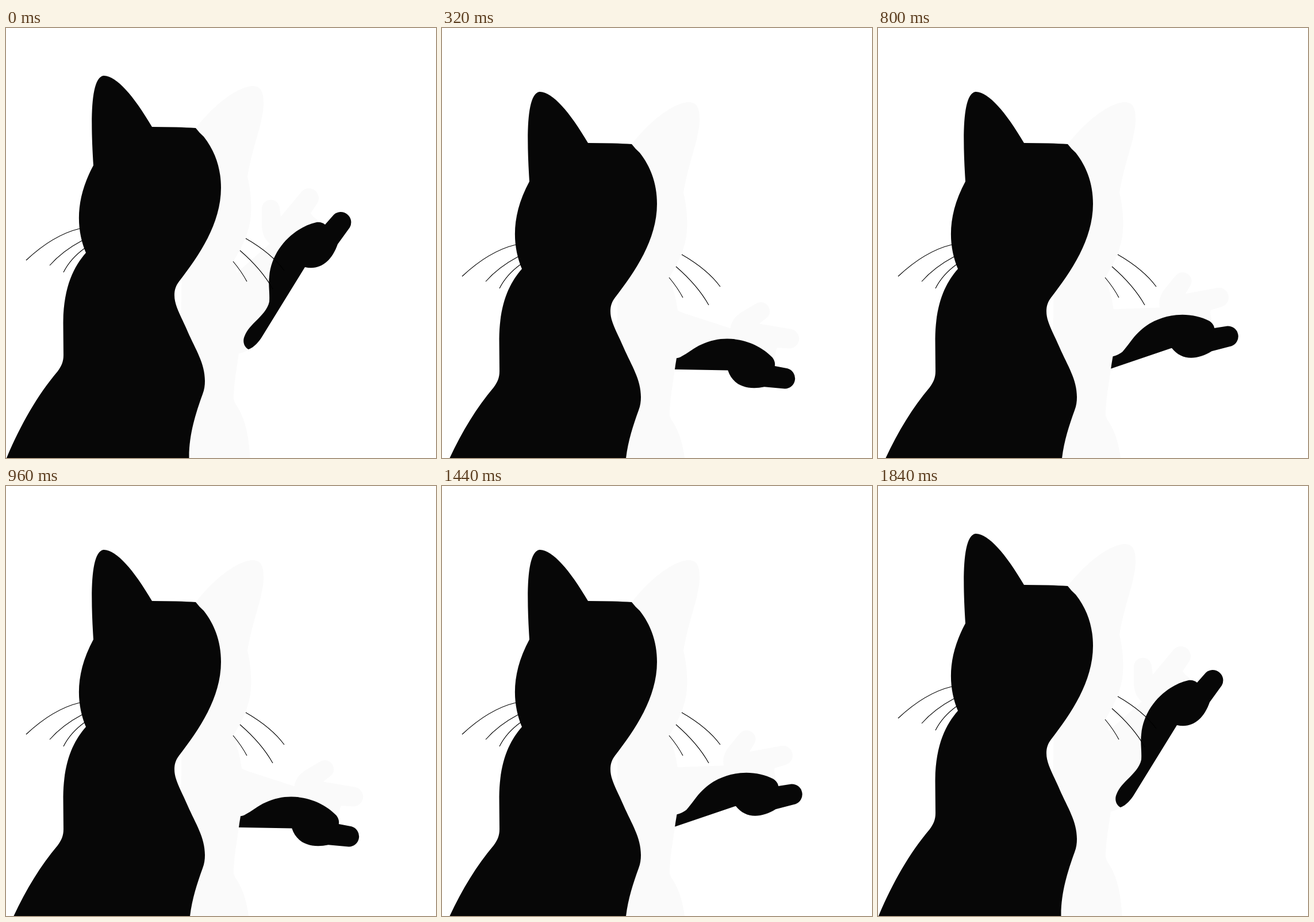
An HTML page that plays this animation: 748x748 px, repeating every 1920 ms.

```html
<!DOCTYPE html>
<html lang="en">
<head>
<meta charset="utf-8">
<title>Cat tapping</title>
<style>
  html, body { margin: 0; height: 100%; overflow: hidden; background: #fff; }
  svg { display: block; width: 100vw; height: 100vh; }
  .pale { fill: #fafafa; }
  .dark { fill: #070707; }
  .whiskers { fill: none; stroke: #000; stroke-width: 1.1; }
</style>
</head>
<body>
<svg viewBox="0 0 748 748">
  <g id="arm">
    <path class="pale" d="M380 443 L397 430 L459 375 C451 369 445 358 445 342 L445 315
      C445 305 452 299 461 299 C470 299 475 305 476 314 L478 328 L514 285
      A17 17 0 0 1 540 307 L530 322 Q533 328 540 332 L548 345 L520 400 L440 530
      L424 558 Q416 564 406 566 L385 560 Z"/>
    <path class="dark" d="M422 559 C414 555 411 545 415 536 C423 514 453 500 458 476
      C459 460 456 447 458 432 C462 385 500 347 540 338 C546 337 552 339 555 342
      L570 325 A18 18 0 0 1 598 347 L577 376 C567 405 547 422 520 416
      L446 536 C440 546 432 555 422 559 Z"/>
  </g>
  <g id="body">
    <path class="pale" d="M310 174 L330 174 C365 130 405 101 430 101
      C445 101 448 115 448 130 C448 165 430 200 420 258 C427 290 427 310 426 325
      C424 352 412 380 395 406 C404 428 413 465 413 497 C413 525 408 543 405 566
      C401 594 396 620 396 646 Q398 653 402 658 C417 682 424 715 425 760 L300 760 Z"/>
    <path class="dark" d="M-4 760 C22 696 52 642 90 597 C97 587 100 580 100 569
      L99.500 513 C100 450 118 415 139 391 C122 350 120 298 152 239
      C147 160 147 88 169 83 C190 81 222 117 254 172 Q300 172 330 174
      Q336 182 344 189 C366 217 374 248 374 278 C374 340 336 396 301 441
      C295 449 293 456 293 465 C293 483 304 500 316 528 C330 560 346 583 346 614
      C346 622 345 629 342 637 C330 670 318 708 318.500 748 L319 760 Z"/>
    <path class="whiskers" d="M128 349 Q82 360 35 404 M132 370 Q98 388 76 413
      M137 383 Q112 401 100 425 M417 366 Q462 392 484 422
      M407 387 Q445 420 464 454 M395 406 Q410 424 419 441"/>
  </g>
</svg>
<script>
  const arm = document.getElementById('arm');
  const body = document.getElementById('body');
  const STEP = 40, LOOP = 1920, TAP = 16, LAST = 14;

  function draw(now) {
    const tick = Math.floor((now % LOOP) / STEP);
    const tap = Math.floor(tick / TAP);
    const n = Math.min(tick % TAP, LAST);

    // The body drops at once, rests, and rises; later taps start one step in.
    const sink = Math.min(1, (n + (tap > 0 ? 1 : 0)) / 3, (LAST - n) / 3);
    body.setAttribute('transform', `translate(0 ${28 * sink})`);

    // The arm swings down and back evenly while its shoulder shifts.
    const swing = Math.min(n, LAST - n);
    const shift = Math.min(1, swing / 4);
    arm.setAttribute('transform',
      `translate(${-23.5 * shift} ${61 * shift}) rotate(${9.9 * swing} 416.5 476)`);
  }

  let start;
  function loop(now) {
    start ??= now;
    draw(now - start);
    requestAnimationFrame(loop);
  }
  draw(0);
  requestAnimationFrame(loop);
</script>
</body>
</html>
```
